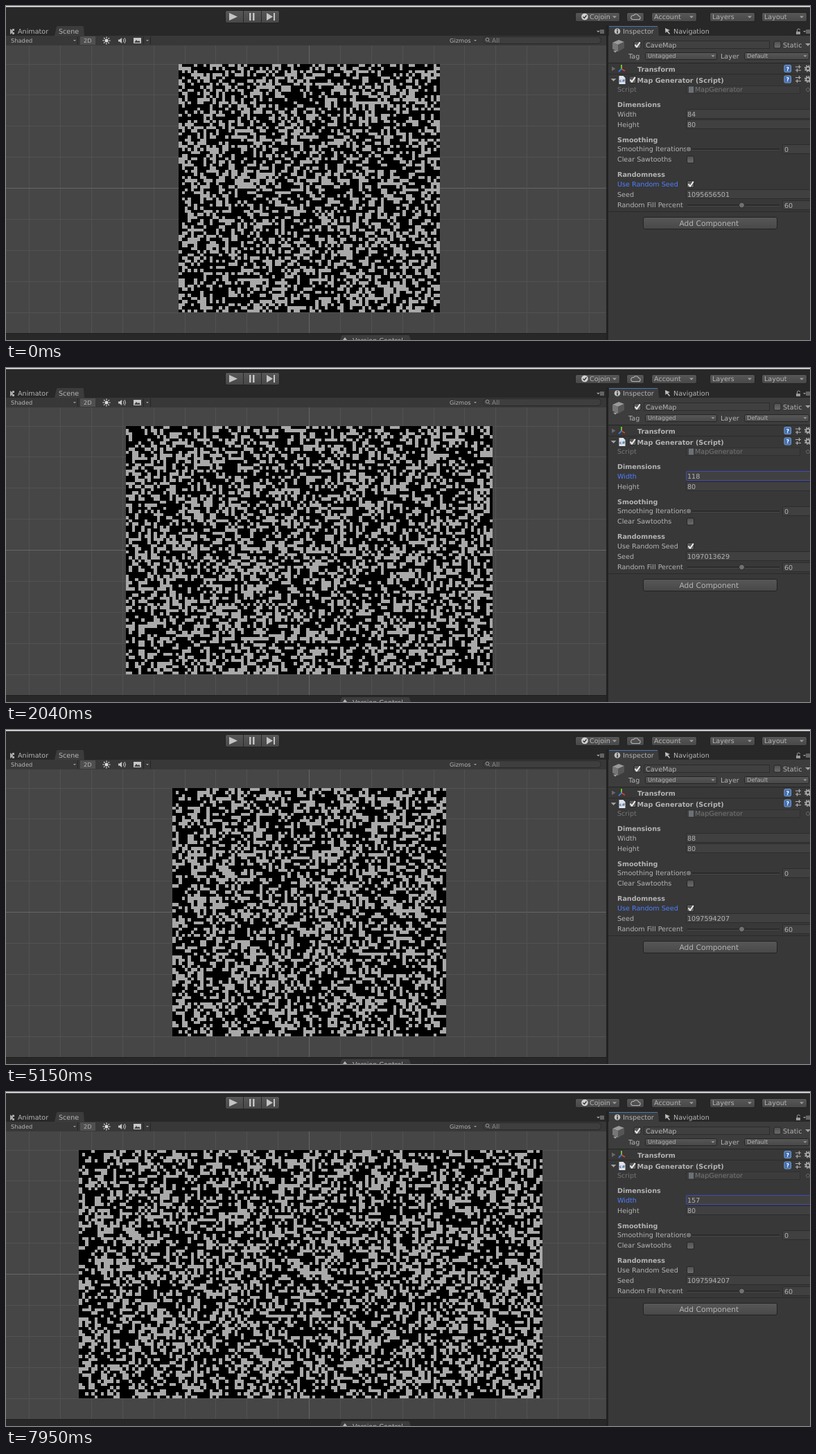
An HTML page with a canvas that plays this animation: 1160x483 px, repeating every 8000 ms.

```html
<!DOCTYPE html>
<html lang="en">
<head>
<meta charset="utf-8">
<title>Cave map generator</title>
<style>
  html, body { margin: 0; width: 100%; height: 100%; overflow: hidden; background: #282828; }
  svg, canvas { position: absolute; left: 0; top: 0; }
  text { font-family: "DejaVu Sans", Verdana, sans-serif; text-rendering: geometricPrecision; white-space: pre; }
</style>
</head>
<body>
<svg id="ui" width="1160" height="483" viewBox="0 0 1160 483"></svg>
<canvas id="map" width="1160" height="483"></canvas>
<script>
const LOOP = 8000, CELL = 4.4875, ROWS = 80, MID_X = 437.5, MID_Y = 263.5;
const INK = '#b4b4b4', BLUE = '#4c7eff';

// ---- SVG helpers ----
const rect = (x, y, w, h, fill, more = '') =>
  `<rect x="${x}" y="${y}" width="${w}" height="${h}" fill="${fill}" ${more}/>`;
const path = (d, fill, more = '') => `<path d="${d}" fill="${fill}" ${more}/>`;
const stroke = (d, color, width = 1) => path(d, 'none', `stroke="${color}" stroke-width="${width}"`);
const text = (x, y, str, { size = 9.6, fill = INK, bold = false, id = '' } = {}) =>
  `<text x="${x}" y="${y}" font-size="${size}" fill="${fill}" ${bold ? 'font-weight="700"' : ''} ${id && `id="${id}"`}>${str}</text>`;
const arrow = (x, y, s = 3) => path(`M${x - s} ${y - s / 2}h${2 * s}l${-s} ${s}z`, '#a0a0a0');
const button = (x, y, w, h) => rect(x + .5, y + .5, w - 1, h - 1, 'url(#btn)', 'rx="2.5" stroke="#222"');
const field = (y, x = 981, id = '') =>
  rect(x + .5, y - 6.5, 190, 13, '#404040', `rx="1" stroke="#2c2c2c" ${id && `id="${id}"`}`);
const tick = (x, y, id = '') =>
  `<path d="M${x - 3.5} ${y}l2.5 3.2l4.8 -6.8" fill="none" stroke="#eee" stroke-width="1.9" ${id && `id="${id}"`}/>`;
const box = (x, y) => rect(x - 5, y - 5, 10, 10, 'url(#check)', 'rx="2" stroke="#252525"');
const popup = (x, y, w, label) =>
  rect(x + .5, y - 5, w, 10, 'url(#btn)', 'rx="2" stroke="#252525"') +
  text(x + 4, y + 2.8, label, { size: 8.3 }) + arrow(x + w - 5, y, 2.5);
const slider = (y, knob, value) =>
  rect(983, y - 1, 133, 2, '#2a2a2a') + rect(983, y + 1, 133, 1, '#484848') +
  `<circle cx="${knob}" cy="${y}" r="4" fill="#707070" stroke="#2a2a2a"/>` +
  field(y, 1120) + text(1123, y + 3.5, value);

function scene() {
  let s = rect(0, 57, 866, 416, '#464646');
  for (let i = -9; i <= 9; i++) {
    const x = Math.floor(MID_X + i * 10 * CELL), y = Math.floor(MID_Y + i * 10 * CELL);
    const color = i ? '#525252' : '#666';
    s += rect(x, 57, 1, 416, color);
    if (Math.abs(i) < 5) s += rect(0, y, 866, 1, color);
  }
  return s;
}

function toolbar() {
  let s = rect(0, 0, 1160, 483, '#282828') + rect(0, 0, 1160, 1.5, '#f0f0f0');
  s += button(316, 6, 79, 19) + rect(342, 7, 1, 17, '#282828') + rect(368, 7, 1, 17, '#282828');
  s += path('M322 10v11l12 -5.5zM351 10h2.5v11h-2.5zM356 10h2.5v11h-2.5zM376 10v11l9 -5.5zM386 10h2v11h-2z', '#c4c4c4');
  const menu = (x, w, label, pad) =>
    button(x, 9, w, 14) + text(x + pad, 19, label) + arrow(x + w - 8, 16);
  s += menu(821, 65, 'Cojoin', 21) + '<circle cx="835" cy="15.5" r="4.8" fill="#d0d0d0"/>' +
    stroke('M832.5 15.5l2 2l3 -4', '#333', 1.3);
  s += button(895, 9, 26, 14) +
    stroke('M904 19.5h8.5a2.5 2.5 0 0 0 .3 -5a4 4 0 0 0 -7.2 -.8a3 3 0 0 0 -1.6 5.8z', '#b4b4b4', 1.1);
  return s + menu(931, 66, 'Account', 4) + menu(1015, 66, 'Layers', 4) + menu(1090, 66, 'Layout', 4);
}

function sceneBar() {
  let s = path('M70 43l3 -13q.5 -1 2 -1h35q1.5 0 2 1l1 13z', '#3c3c3c') + rect(0, 43, 866, 14, '#383838');
  s += path('M6 33l3 2v-2h3v3h-2v2h2v3h-3v-2l-3 2z', '#a8a8a8') + text(17, 39.5, 'Animator') + text(76, 39.5, 'Scene');
  s += text(7, 53, 'Shaded', { size: 8.3 }) + arrow(99, 50, 2) + rect(103, 44, 1, 12, '#262626');
  s += rect(107, 44, 22, 12, '#505050') + text(112, 53, '2D', { size: 8.3 });
  s += '<circle cx="145" cy="50" r="2.5" fill="#ddd"/>';
  for (let a = 0; a < 360; a += 45) s += rect(148.5, 49.5, 2, 1.2, '#ddd', `transform="rotate(${a} 145 50)"`);
  s += path('M162 48.5h2l3 -2.5v8l-3 -2.5h-2z', '#c8c8c8') + stroke('M169 47.5q2 2.5 0 5M171 46q3 4 0 8', '#c8c8c8');
  s += rect(184, 46, 11, 8, '#c8c8c8') + path('M185 53l3 -4l2 2l2 -1l2 3z', '#444') + arrow(204, 50, 2);
  s += rect(198, 44, 1, 12, '#262626') + rect(208, 44, 1, 12, '#262626');
  s += text(640, 53, 'Gizmos', { size: 8.3 }) + arrow(677, 50, 2);
  s += rect(688.5, 44.5, 170, 10, '#3e3e3e', 'rx="5" stroke="#2a2a2a"') +
    '<circle cx="694.5" cy="48.5" r="2.3" fill="none" stroke="#999"/>' + stroke('M696 50.5l2 2', '#999') +
    text(701, 52.5, 'All', { size: 9, fill: '#888' });
  return s + arrow(854.5, 37, 2.5) + stroke('M857 35h6M857 37h6M857 39h6', '#a0a0a0');
}

function componentIcons(y) {
  return rect(1123, y - 5, 9.5, 10, '#3f6db0', 'rx="1.5" stroke="#7f9fcf"') +
    text(1125.6, y + 3, '?', { size: 8, fill: '#fff', bold: true }) +
    stroke(`M1139 ${y - 2.5}h8M1139 ${y + 2.5}h8M1144.5 ${y - 5}v5M1141.5 ${y}v5`, '#b0b0b0', 1.2) +
    `<circle cx="1157" cy="${y}" r="2.7" fill="none" stroke="#b0b0b0" stroke-width="1.8"/>` +
    `<circle cx="1157" cy="${y}" r="4.3" fill="none" stroke="#b0b0b0" stroke-width="1.6" stroke-dasharray="1.7 1.7"/>`;
}

function inspector() {
  let s = rect(866, 28, 3, 455, '#222') + rect(869, 43, 291, 440, '#383838');
  s += path('M870 43v-13q0 -1 1 -1h68q1.5 0 2 1l1 13z', '#3c3c3c') + rect(870, 29, 70, 1, '#4a78b4');
  s += '<circle cx="882" cy="36.5" r="4.3" fill="#c0c0c0"/>' + rect(881.3, 35.5, 1.6, 4, '#333') + rect(881.3, 33.2, 1.6, 1.5, '#333');
  s += text(890, 39.5, 'Inspector') + text(963, 39.5, 'Navigation');
  s += path('M951 32l7 3l-3 1l3 4l-1 1l-3.5 -4l-2 2z', '#c0c0c0');
  s += rect(1140, 37, 6, 4, '#999') + stroke('M1141.5 37v-2a2 2 0 0 1 4 0', '#999') + arrow(1152, 37, 2) +
    stroke('M1154 35h6M1154 37h6M1154 39h6', '#a0a0a0');

  // object header
  s += rect(869, 43, 291, 39, '#3d3d3d');
  s += path('M875 53l9 -4l8 3l-9 4z', '#9a9a9a') + path('M875 53l8 3v10l-8 -4z', '#777') + path('M892 52l-9 4v10l9 -5z', '#555');
  s += arrow(879, 66, 3);
  s += box(911, 56) + tick(911, 56) + rect(920.5, 50.5, 181, 11, '#404040', 'stroke="#2c2c2c"') + text(923, 59.5, 'CaveMap');
  s += box(1113, 56) + text(1121, 59.5, 'Static') + arrow(1157, 56, 4);
  s += text(898, 76, 'Tag') + popup(922, 72.5, 103, 'Untagged') + text(1031, 76, 'Layer') + popup(1065, 72.5, 93, 'Default');

  // component headers
  s += rect(869, 82, 291, 1, '#252525') + rect(869, 98, 291, 1, '#2a2a2a');
  s += path('M874 87.5l5.5 3.2l-5.5 3.2z', '#686868') + arrow(876.5, 107, 3.8);
  s += stroke('M888 91v-6', '#7ad02c', 1.8) + stroke('M888 91l5 3', '#d8432c', 1.8) + stroke('M888 91l-4 4', '#3d74e0', 1.8);
  s += text(911, 94.5, 'Transform', { bold: true }) + componentIcons(90.5);
  s += path('M884.5 101h6l3 3v9h-9z', '#e0e5ec') + text(885, 110, 'c#', { size: 6, fill: '#46699c', bold: true });
  s += box(904, 106.5) + tick(904, 106.5) + text(910.5, 110.5, 'Map Generator (Script)', { bold: true }) + componentIcons(106);
  s += text(882, 124, 'Script', { fill: '#757575' }) + rect(981.5, 115.5, 164, 11, '#3c3c3c', 'stroke="#303030"');
  s += rect(985, 116.5, 7, 9, '#6c7076') + text(994, 124, 'MapGenerator', { fill: '#757575' });
  s += '<circle cx="1157" cy="121" r="2.5" fill="none" stroke="#666"/>';

  // fields
  for (const [y, label] of [[142.5, 'Dimensions'], [193, 'Smoothing'], [243.5, 'Randomness']])
    s += text(882, y + 3.5, label, { bold: true });
  s += text(882, 159.5, 'Width', { id: 'widthLabel' }) + field(156, 981, 'widthField') + text(983, 159.5, '', { id: 'width' });
  s += text(882, 174.5, 'Height') + field(171) + text(983, 174.5, '80');
  s += text(882, 210.2, 'Smoothing Iterations') + slider(207, 985, '0');
  s += text(882, 225.2, 'Clear Sawtooths') + box(987.5, 222);
  s += text(882, 260.8, 'Use Random Seed', { id: 'randomLabel' }) + box(987.5, 257.5) + tick(988, 257.5, 'randomTick');
  s += text(882, 275.8, 'Seed') + field(272) + text(983, 275.8, '', { id: 'seed' });
  s += text(882, 290.8, 'Random Fill Percent') + slider(288, 1061.5, '60');
  s += rect(869, 297, 291, 1, '#2a2a2a') + button(919, 305, 194, 18) + text(971.5, 318, 'Add Component', { size: 10.65 });
  return s;
}

function footer() {
  return rect(0, 473, 866, 10, '#282828') + rect(0, 473, 866, 1, '#1e1e1e') +
    path('M482 483l2 -6q.5 -1 2 -1h94q1.5 0 2 1l2 6z', '#3c3c3c') +
    path('M486 483l3 -4l3 4z', '#b4b4b4') + text(500, 487, 'Version Control');
}

const shade = (id, top, bottom) =>
  `<linearGradient id="${id}" x2="0" y2="1"><stop stop-color="${top}"/><stop offset="1" stop-color="${bottom}"/></linearGradient>`;
const $ = id => document.getElementById(id);
$('ui').innerHTML = `<defs>${shade('btn', '#575757', '#484848')}${shade('check', '#505050', '#6c6c6c')}</defs>` +
  toolbar() + scene() + sceneBar() + inspector() + footer();

// ---- Map ----
// Subtractive generator as in Mono's System.Random
function makeRandom(seed) {
  const BIG = 2147483647, a = new Int32Array(56);
  const sub = (p, q) => { const v = (p - q) | 0; return v < 0 ? v + BIG : v; };
  let mj = 161803398 - seed, mk = 1;
  a[55] = mj;
  for (let i = 1; i < 55; i++) {
    const k = 21 * i % 55;
    a[k] = mk;
    mk = sub(mj, mk);
    mj = a[k];
  }
  for (let round = 0; round < 4; round++)
    for (let i = 1; i < 56; i++) a[i] = sub(a[i], a[1 + (i + 30) % 55]);
  let p = 0, q = 31;
  return () => {
    p = p % 55 + 1;
    q = q % 55 + 1;
    return (a[p] = sub(a[p], a[q])) / BIG;
  };
}

const ctx = $('map').getContext('2d');
function drawMap(cols, seed) {
  const random = makeRandom(seed);
  const px = c => Math.round(MID_X + (c - Math.floor(cols / 2)) * CELL);
  const py = r => Math.round(MID_Y + (ROWS / 2 - r) * CELL);
  ctx.clearRect(0, 0, 1160, 483);
  ctx.fillStyle = '#000';
  ctx.fillRect(px(0), py(ROWS), px(cols) - px(0), py(0) - py(ROWS));
  ctx.fillStyle = '#a9a9a9';
  for (let c = 0; c < cols; c++)
    for (let r = 0; r < ROWS; r++)
      if (random() >= 0.6) ctx.fillRect(px(c), py(r + 1), px(c + 1) - px(c), py(r) - py(r + 1));
}

// ---- Timeline ----
// Each drag: start, end, widths shown; the map trails the number by one step
const drags = [
  [800, 1190, [86, 90, 95, 100, 104, 104]],
  [1340, 2040, [105, 106, 107, 109, 111, 113, 115, 116, 118, 118]],
  [2470, 2900, [114, 108, 102, 96, 91, 88, 88]],
  [7260, 7950, [95, 103, 112, 120, 127, 133, 138, 143, 149, 157]]
];
const seedKeys = [[0, 1095656501], [11, 1096633665], [16, 1097013629], [23, 1097594207]];
function seedAt(n) {
  const i = seedKeys.findIndex(k => k[0] >= n);
  if (i < 0) return seedKeys[3][1];
  if (i === 0) return seedKeys[0][1];
  const [n0, s0] = seedKeys[i - 1], [n1, s1] = seedKeys[i];
  return Math.round(s0 + (s1 - s0) * (n - n0) / (n1 - n0));
}

const steps = [{ at: 0, width: 84, cols: 84, seed: seedAt(0) }];
for (const [start, end, widths] of drags)
  widths.forEach((width, i) => steps.push({
    at: Math.ceil((start + (end - start) * i / (widths.length - 1)) / 10) * 10,
    width, cols: steps[steps.length - 1].width, seed: seedAt(steps.length)
  }));

let shown;
function frame(now) {
  const t = now % LOOP;
  const step = steps.filter(s => s.at <= t).pop();
  if (step !== shown) {
    shown = step;
    drawMap(step.cols, step.seed);
    $('width').textContent = step.width;
    $('seed').textContent = step.seed;
  }
  const onWidth = t >= 500 && t < 5150 || t >= 7030;
  $('widthLabel').setAttribute('fill', onWidth ? BLUE : INK);
  $('widthField').setAttribute('stroke', onWidth ? '#4149b8' : '#2c2c2c');
  $('randomLabel').setAttribute('fill', onWidth ? INK : BLUE);
  $('randomTick').setAttribute('visibility', t < 5230 ? 'visible' : 'hidden');
  requestAnimationFrame(() => frame(performance.now()));
}
frame(performance.now());
</script>
</body>
</html>
```
